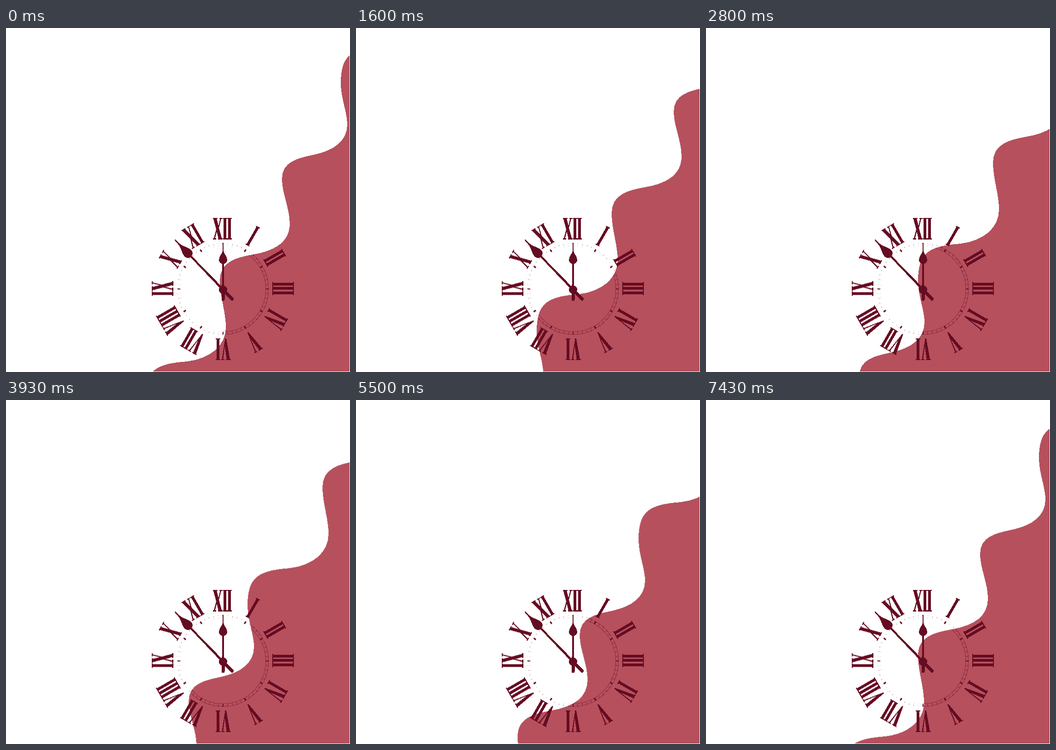
Recreate the animation shown at these times as an HTML page without scripts. Size 748x748 px, loop 7.51 s.

```html
<!DOCTYPE html>
<html lang="en">
<head>
<meta charset="utf-8">
<title>Clock and wave</title>
<style>
  html, body { margin: 0; width: 100%; height: 100%; overflow: hidden; background: #fff; }
  .stage { display: block; width: 100vw; height: 100vh; shape-rendering: crispEdges; }
  .wave { fill: #b6505d; }
  .dark { fill: #650c22; }
  .tail { stroke: #650c22; stroke-width: 7; stroke-linecap: round; }
  .ring { fill: none; stroke: #a6d2d8; mix-blend-mode: color-burn; }
  .marks { fill: none; stroke: #650c22; }

  /* The wave advances twice per 100 ms: a short step at 30 ms, a long one at 100 ms. */
  .long { animation: long 7510ms infinite; }
  .short { animation: short 7510ms infinite; }
  @keyframes long {
    0% { transform: translate(0, 0); animation-timing-function: steps(75, jump-none); }
    99.866%, 100% { transform: translate(294.2px, -473.8px); }
  }
  @keyframes short {
    0% { transform: translate(0, 0); animation-timing-function: step-end; }
    .399% { transform: translate(1.7px, -2.74px); animation-timing-function: steps(74, end); }
    98.934%, 100% { transform: translate(127.8px, -205.8px); }
  }
</style>
</head>
<body>
<svg class="stage" viewBox="0 0 748 748">
  <defs>
    <!-- one repeat of the edge, filled to the right and below -->
    <path id="swell" d="M672 275C635 283 600 290 600 328C600 360 617 392 617 425
      C617 462 590 483 540 492C500 499 465 508 465 549C465 585 478 616 478 651
      C478 690 445 719 394 725C328 730 302 742 302 806C302 840 316 868 316 897
      C316 930 288 952 246 961V2400H2000V275Z"/>

    <path id="I" d="M0-23.5H9.4V-21.3H7.7V21.3H9.4V23.5H0V21.3H1.7V-21.3H0Z"/>
    <g id="II"><use href="#I"/><use href="#I" x="9.4"/></g>
    <g id="III"><use href="#II"/><use href="#I" x="18.8"/></g>
    <path id="V" d="M0-23.5H10.5V-21.3H8.8L12.8 7L16.2-21.3H14V-23.5H21V-21.3H18.8L12 23.5H9.6L1.6-21.3H0Z"/>
    <path id="X" d="M0-23.5H10V-21.3H8.6L12.4-6L16.2-21.3H14V-23.5H21V-21.3H18.6L13.6-1.5L19.6 21.3H21V23.5H11V21.3H12.4L8.8 7L5 21.3H7V23.5H0V21.3H2.4L7.6 2L1.4-21.3H0Z"/>
  </defs>

  <rect width="748" height="748" fill="#fff"/>

  <svg width="747" height="747">
    <g class="wave long">
      <g class="short">
        <use href="#swell" x="426" y="-686"/>
        <use href="#swell"/>
        <use href="#swell" x="-426" y="686"/>
      </g>
    </g>
  </svg>

  <g transform="translate(472 567.5)">
    <g class="ring">
      <circle r="99"/>
      <circle r="93"/>
      <circle r="96" stroke-width="6" pathLength="600" stroke-dasharray="1 9" stroke-dashoffset=".5"/>
    </g>
    <g class="marks">
      <circle r="98.5" stroke-width="2" stroke-opacity=".7" pathLength="600" stroke-dasharray=".7 9.3" stroke-dashoffset=".35"/>
      <circle r="94" stroke-width="1" stroke-opacity=".5" pathLength="600" stroke-dasharray=".7 9.3" stroke-dashoffset=".35"/>
      <circle r="96" stroke-width="6" pathLength="600" stroke-dasharray="3 47" stroke-dashoffset="1.5"/>
    </g>

    <g class="dark">
      <g transform="translate(-2 -131.5)"><use href="#X" x="-20.5"/><use href="#II" x="1.8"/></g>
      <g transform="rotate(30) translate(-1.6 -131.8)"><use href="#I" x="-4.7"/></g>
      <g transform="rotate(60) translate(-2.5 -131)"><use href="#II" x="-9.4"/></g>
      <g transform="rotate(90) translate(-1 -130.5)"><use href="#III" x="-14.1"/></g>
      <g transform="rotate(120) translate(1 -131.4)"><use href="#I" x="-15.7"/><use href="#V" x="-5.5"/></g>
      <g transform="rotate(150) translate(0 -132)"><use href="#V" x="-10.5"/></g>
      <g transform="rotate(180) translate(0 -131)"><use href="#V" x="-16.5"/><use href="#I" x="6.3"/></g>
      <g transform="rotate(210) translate(-1 -130.5)"><use href="#V" x="-20.5"/><use href="#II" x="1.8"/></g>
      <g transform="rotate(240) translate(-3 -132.5)"><use href="#V" x="-25"/><use href="#III" x="-3"/></g>
      <g transform="rotate(270) translate(1 -132)"><use href="#I" x="-15.7"/><use href="#X" x="-5.2"/></g>
      <g transform="rotate(300) translate(-1.3 -131.3)"><use href="#X" x="-10.5"/></g>
      <g transform="rotate(330) translate(.8 -132.3)"><use href="#X" x="-15.7"/><use href="#I" x="6.3"/></g>
    </g>
  </g>

  <g class="dark" transform="translate(472 569)">
    <path d="M-1-102H1V-85C2-77 9-73 9-65A9 9 0 0 1 2-56L2.6 0H-2.6L-2-56A9 9 0 0 1-9-65C-9-73-2-77-1-85Z"/>
    <path class="tail" d="M0 0V21"/>
    <g transform="rotate(-44)">
      <path d="M-1-151H1L2-135C4-125 10-119 10-110A10 10 0 0 1 2-100L2.6 0H-2.6L-2-100A10 10 0 0 1-10-110C-10-119-4-125-2-135Z"/>
      <path class="tail" stroke-width="6" d="M0 0V28"/>
    </g>
    <circle r="9"/>
  </g>
</svg>
</body>
</html>
```
